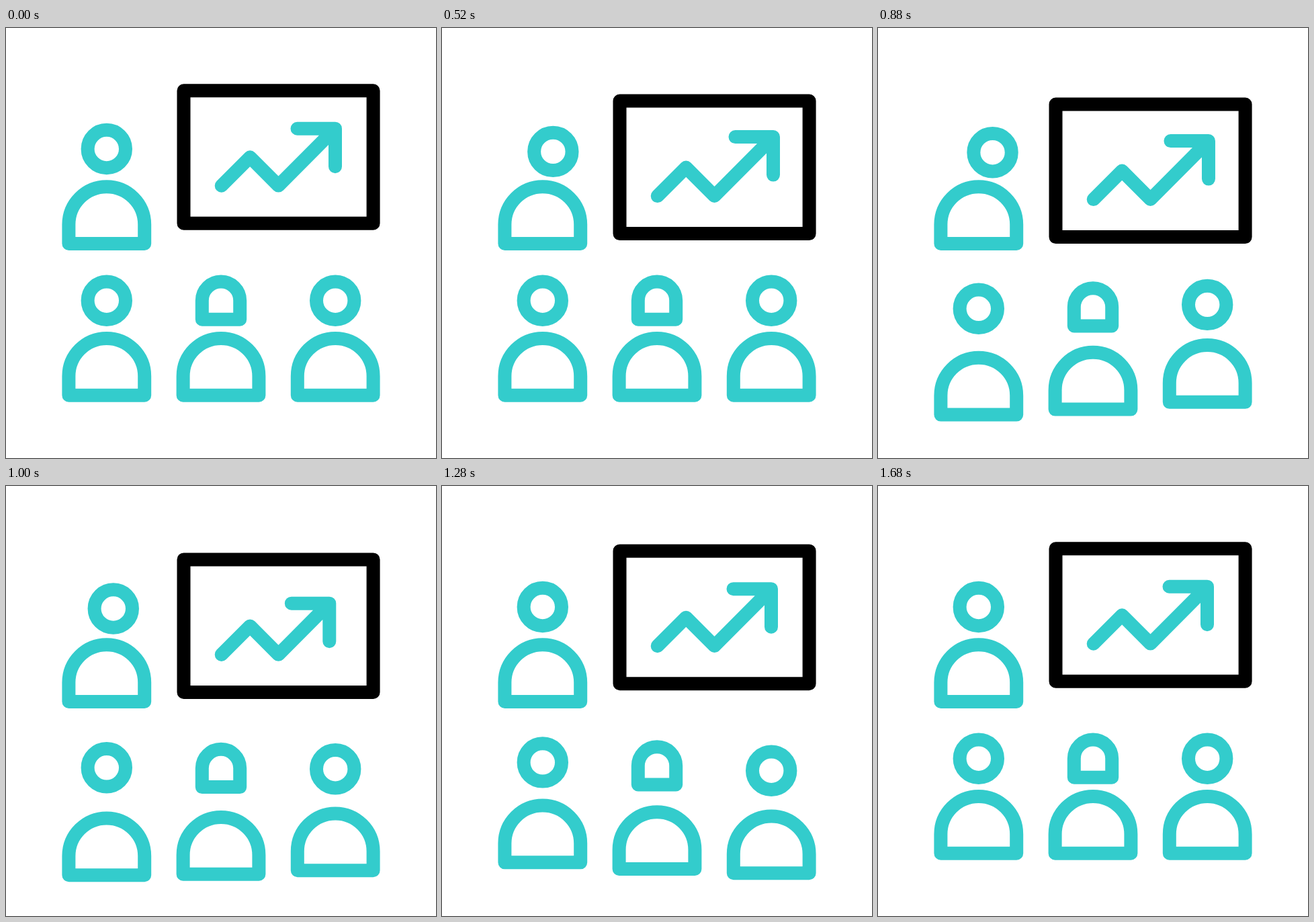
These frames come from a looping animation (640 by 640 pixels, 1.76 s). An HTML page with a canvas:

```html
<!DOCTYPE html>
<html lang="en">
<head>
<meta charset="utf-8">
<title>Presentation</title>
<style>
  html, body { margin: 0; width: 100%; height: 100%; overflow: hidden; background: #fff; }
  canvas { display: block; width: 640px; height: 640px; }
</style>
</head>
<body>
<canvas id="stage"></canvas>
<script>
const LOOP = 1760, STEP = 40, LAST = 1680;
const TEAL = '#33cccc', BLACK = '#000';
const canvas = document.getElementById('stage');
const ctx = canvas.getContext('2d');
const ratio = window.devicePixelRatio || 1;
canvas.width = canvas.height = 640 * ratio;
ctx.scale(ratio, ratio);

const smooth = s => s * s * (3 - 2 * s);

// Ease in and out along the curve cubic-bezier(.5, 0, .5, 1)
function strong(x) {
  let lo = 0, hi = 1;
  for (let i = 0; i < 24; i++) {
    const s = (lo + hi) / 2;
    if (1.5 * s * (1 - s) + s ** 3 < x) lo = s; else hi = s;
  }
  return smooth(lo);
}

// Value at time t for keys given as [time, value]
function track(t, keys, ease) {
  if (t <= keys[0][0]) return keys[0][1];
  for (let i = 1; i < keys.length; i++) {
    const [t0, v0] = keys[i - 1], [t1, v1] = keys[i];
    if (t < t1) return v0 + (v1 - v0) * ease((t - t0) / (t1 - t0));
  }
  return keys[keys.length - 1][1];
}

const SCREEN = [[37, 0], [784, 21.6], [1448, 0]];
const LEAN = [[240, 0], [735, 1], [1218, 0]];
const SINK = [[532, 0], [1000, 1], [1518, 0]];
const ARROW = [[40, 0], [360, -19], [680, 25], [1000, -8.7], [1245, 0]];

const AUDIENCE = [
  { x: 149.8, delay: 0, headDrop: 13.6 },
  { x: 320, delay: 80, headDrop: 15, hood: true },
  { x: 490.2, delay: 160, headDrop: 19.8 }
];

function stroke(color, build) {
  ctx.beginPath();
  build();
  ctx.strokeStyle = color;
  ctx.stroke();
}

function polyline(points) {
  points.forEach(([x, y], i) => i ? ctx.lineTo(x, y) : ctx.moveTo(x, y));
}

// Half circle on straight sides with a flat base
function dome(x, y, r, side) {
  stroke(TEAL, () => {
    ctx.moveTo(x - r, y + side);
    ctx.arc(x, y, r, Math.PI, 0);
    ctx.lineTo(x + r, y + side);
    ctx.closePath();
  });
}

const head = (x, y) => stroke(TEAL, () => ctx.arc(x, y, 28.2, 0, 2 * Math.PI));
const body = (x, y) => dome(x, y, 56.4, 28.4);

function drawScreen(t) {
  const y = track(t, SCREEN, smooth);
  const reach = track(t, ARROW, smooth);
  const tipX = 490 + reach, tipY = 149.7 + y - reach;
  stroke(BLACK, () => ctx.rect(264.5, 93.2 + y, 282.1, 197.5));
  stroke(TEAL, () => {
    polyline([[320.7, 234.7 + y], [363.2, 192.2 + y], [405.5, 234.6 + y], [tipX, tipY]]);
    polyline([[tipX - 56.5, tipY], [tipX, tipY], [tipX, tipY + 56.5]]);
  });
}

function draw(t) {
  ctx.fillStyle = '#fff';
  ctx.fillRect(0, 0, 640, 640);
  ctx.lineWidth = 20;
  ctx.lineCap = ctx.lineJoin = 'round';

  drawScreen(t);

  const lean = track(t, LEAN, strong);
  head(149.8 + 24.7 * lean, 180 + 6.2 * lean);
  body(149.8, 292.6);

  for (const { x, delay, headDrop, hood } of AUDIENCE) {
    const sink = track(t - delay, SINK, strong);
    const headY = 405.7 + headDrop * sink;
    if (hood) dome(x, headY, 28.2, 28.1);
    else head(x, headY);
    body(x, 518.3 + 32.5 * sink);
  }
}

const start = performance.now();
function tick() {
  const t = (performance.now() - start) % LOOP;
  draw(Math.min(Math.floor(t / STEP) * STEP, LAST));
  requestAnimationFrame(tick);
}
tick();
</script>
</body>
</html>
```
